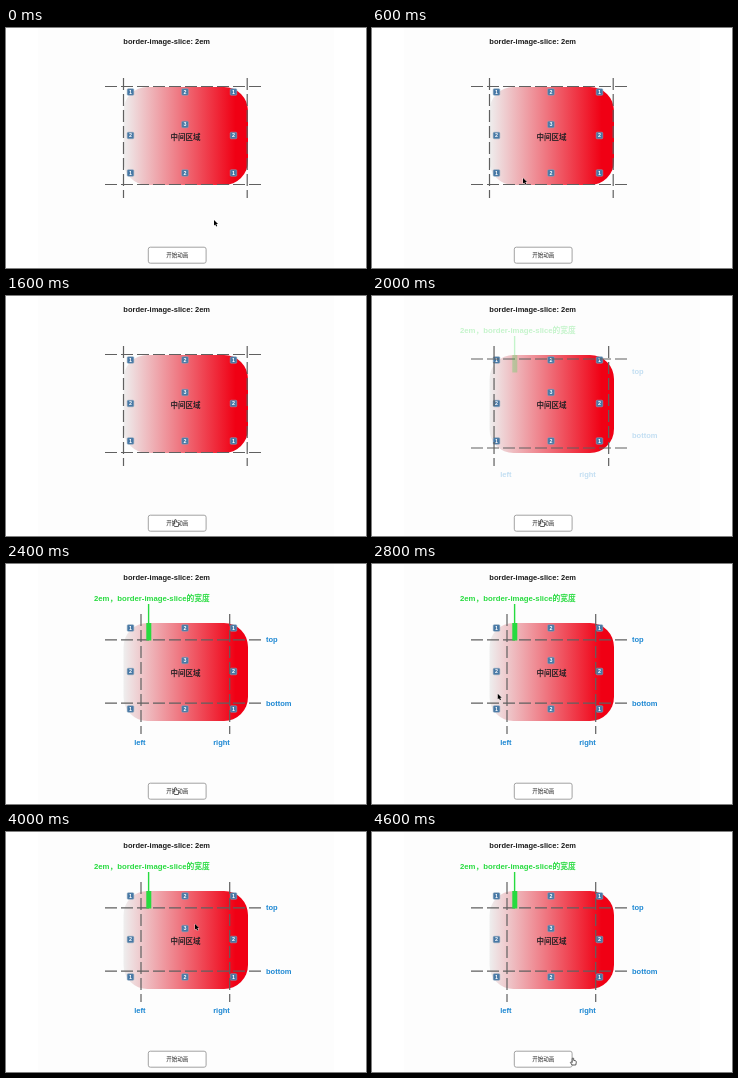
Write an HTML page that moves like this. It is 360x240 px and loops after 4800 ms.

```html
<!DOCTYPE html>
<html lang="zh">
<head>
<meta charset="utf-8">
<style>
  html, body { margin: 0; width: 100%; height: 100%; overflow: hidden; background: #fff; }
  svg { display: block; width: 360px; height: 240px; }
  text { font: bold 7.5px "Liberation Sans", "Noto Sans CJK SC", "Noto Sans CJK", sans-serif; }
  #lines path { stroke: #606060; stroke-width: 1.2; stroke-dasharray: 12 4; }
  #badges rect { fill: #4778a5; stroke: #8fa6ba; stroke-width: .5; }
  #badges text { font-size: 5.4px; fill: #fff; text-anchor: middle; }
  #notes text { fill: #1a86d2; }
  #notes .green { fill: #27db3f; }
</style>
</head>
<body>
<svg viewBox="0 0 360 240">
  <defs>
    <linearGradient id="fade">
      <stop offset="0" stop-color="#eee"/>
      <stop offset=".9" stop-color="#f00014"/>
    </linearGradient>
  </defs>
  <rect x="32" width="296" height="240" fill="#fdfdfd"/>
  <text x="117.3" y="16" fill="#1a1a1a">border-image-slice: 2em</text>
  <rect x="117.5" y="59" width="124.5" height="98" rx="24" fill="url(#fade)"/>
  <text x="179.5" y="111.5" fill="#2a2226" text-anchor="middle">中间区域</text>
  <g id="badges"></g>
  <g id="lines"><path/><path/><path/><path/></g>
  <g id="notes">
    <rect class="green" x="140.3" y="59" width="5" height="17.5"/>
    <rect class="green" x="141.9" y="40" width="1.4" height="20"/>
    <text class="green" x="88" y="37" style="font-size:7.75px">2em，border-image-slice的宽度</text>
    <text x="260" y="78.3">top</text>
    <text x="260" y="142">bottom</text>
    <text x="128.2" y="181">left</text>
    <text x="207.2" y="181">right</text>
  </g>
  <rect x="142.3" y="219.2" width="57.8" height="16" rx="2" fill="#fff" stroke="#999" stroke-width=".9"/>
  <text x="171.2" y="229.1" fill="#222" text-anchor="middle" style="font-size:5.5px;font-weight:500">开始动画</text>
  <path id="arrow" d="M0 0V5.6L1.3 4.5L2.2 6.6L3.2 6.1L2.3 4.1H4Z" fill="#000" stroke="#fff" stroke-width=".6" paint-order="stroke"/>
  <path id="hand" d="M-.8 .4Q0-.4 .7 .4V2.4L2.6 2.8Q3.4 3.1 3.3 4.2L2.8 7H-1L-2.6 4.4Q-2.2 3.5-1.4 4.2L-.8 4.6Z" fill="#fff" stroke="#333" stroke-width=".8"/>
</svg>
<script>
const $ = id => document.getElementById(id);
const lines = $('lines').children;
const smooth = q => q * q * (3 - 2 * q);

// Corners are 1, edges are 2 and the middle is 3; the middle one sits above its caption
for (const row of [0, 1, 2]) for (const col of [0, 1, 2]) {
  const n = 1 + (row === 1) + (col === 1);
  const x = [124.5, 179, 227.5][col];
  const y = n === 3 ? 96.5 : 64 + row * 40.5 + (row === 1 ? 3 : 0);
  $('badges').innerHTML +=
    `<rect x="${x - 3.3}" y="${y - 3.3}" width="6.6" height="6.6" rx="1"/>
     <text x="${x}" y="${y + 1.9}">${n}</text>`;
}

// Places the pointer visits
const stops = [
  { t: 0, x: 208, y: 192 }, { t: 600, x: 151, y: 150 },
  { t: 1600, x: 169.5, y: 223.5 }, { t: 2400, x: 169.5, y: 223.5 },
  { t: 3200, x: 82, y: 36 }, { t: 4000, x: 189, y: 92 },
  { t: 4600, x: 201, y: 226 }, { t: 4800, x: 208, y: 192 }
];

function pointer(t) {
  const i = stops.findIndex(s => s.t > t);
  const a = stops[i - 1], b = stops[i];
  const p = smooth((t - a.t) / (b.t - a.t));
  return [a.x + (b.x - a.x) * p, a.y + (b.y - a.y) * p];
}

function draw(t) {
  const p = smooth(Math.min(1, Math.max(0, (t - 1800) / 600)));
  const dx = 17.5 * p, dy = 17.3 * p;
  [
    `M${117.5 + dx} 50V170`, `M${241.2 - dx} 50V170`,
    `M99 ${58.5 + dy}H257`, `M99 ${156.5 - dy}H257`
  ].forEach((d, i) => lines[i].setAttribute('d', d));
  $('notes').setAttribute('opacity', p);

  const [x, y] = pointer(t);
  const over = x > 142 && x < 203 && y > 219;
  for (const id of ['arrow', 'hand']) {
    $(id).setAttribute('transform', `translate(${x} ${y})`);
    $(id).style.display = (id === 'hand') === over ? '' : 'none';
  }
}

const start = performance.now();
function tick() {
  const t = (performance.now() - start) % 4800;
  draw(Math.floor(t / 200) * 200); // five pictures a second
  requestAnimationFrame(tick);
}
tick();
</script>
</body>
</html>
```
